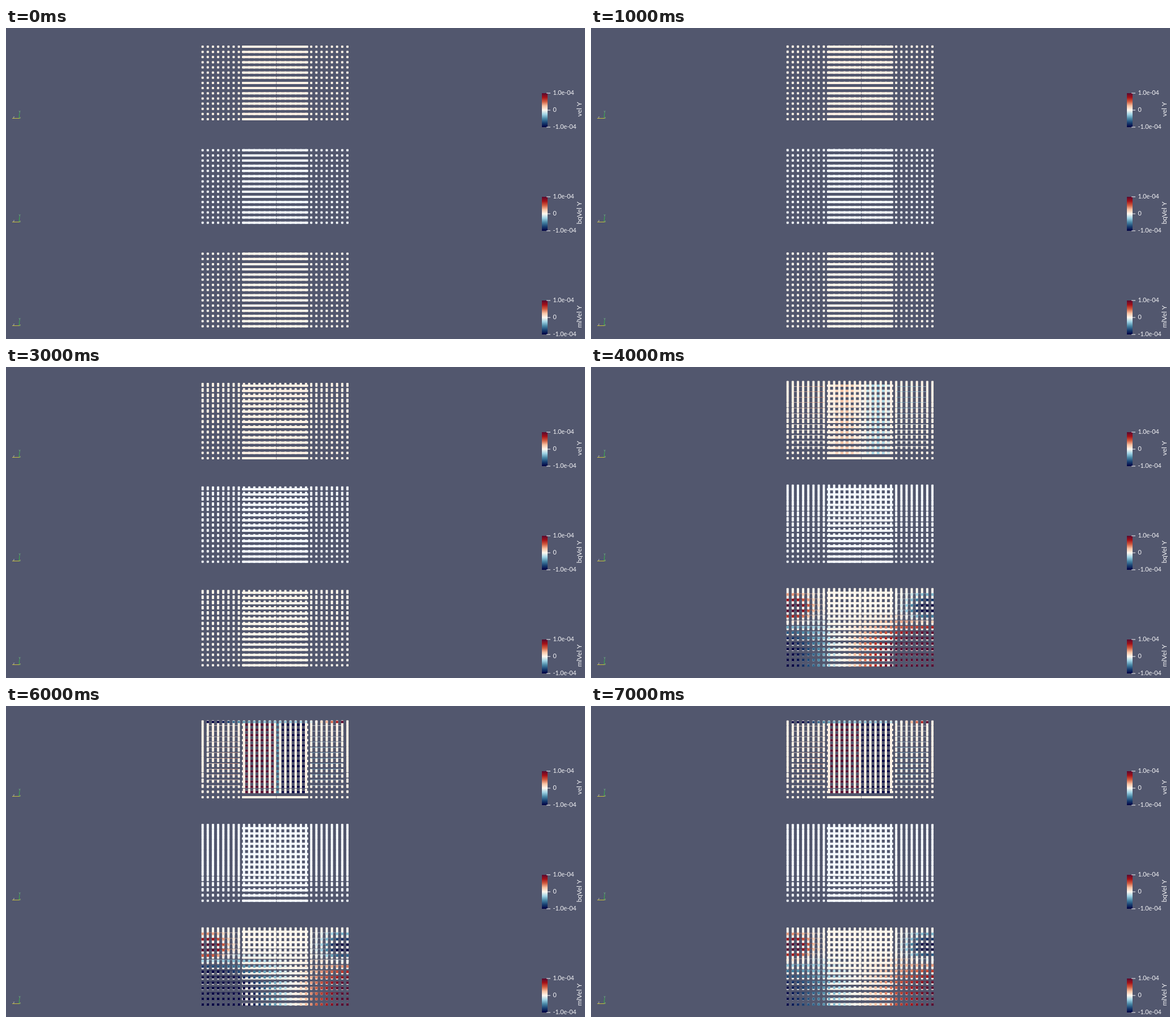
Write an HTML page with a canvas that moves like this. It is 1021 by 549 pixels and loops after 8 s.

```html
<!DOCTYPE html>
<html>
<head>
<meta charset="utf-8">
<style>
html, body { margin: 0; width: 100%; height: 100%; overflow: hidden; background: #52576e; }
canvas { display: block; }
</style>
</head>
<body>
<canvas id="stage" width="1021" height="549"></canvas>
<script>
const ctx = document.getElementById('stage').getContext('2d');
const BG = '#52576e', INK = '#f4f4f6', COLS = 29, ROWS = 15;
const colX = i => 346.7 + i * 9.12;
const rowY = j => 33 + j * 9.14;
const clamp = (v, a, b) => Math.max(a, Math.min(b, v));
const bump = (x, center, width) => Math.exp(-(((x - center) / width) ** 2));
const ramp = (x, a, b) => clamp((x - a) / (b - a), 0, 1);

// Diverging colour map, from -1 to 1
const STOPS = ['#000042', '#183e70', '#4886a4', '#a0d3e5', '#fff9f0', '#f8c4a5', '#d05c40', '#a41118', '#580a30']
  .map(hex => [1, 3, 5].map(k => parseInt(hex.slice(k, k + 2), 16)));
function heat(v) {
  const p = (clamp(v, -1, 1) + 1) * 4, k = Math.min(7, Math.floor(p)), f = p - k;
  return `rgb(${STOPS[k].map((c, n) => Math.round(c + (STOPS[k + 1][n] - c) * f))})`;
}

// Stretch of the top row; it grows, jumps at step 4, then settles
const rise = step => step < 4 ? step * step / 3 : 7.6 - step * 0.3;

// Middle block: up on the left, down on the right, four times stronger each step
const swirl = (step, x) => Math.sin(2 * Math.PI * x) * 0.25 * 4 ** (step - 4);

// Outer columns of the first panel
const drift = (step, u, v) =>
  Math.sin(2 * Math.PI * u) * 0.4 * bump(v, step > 5 ? 0.55 : 0.2, 0.3);

// Sloshing: the lower half tilts about a pivot, the upper corners go the other way
function slosh(step, u, v) {
  const [tilt, pivot] = [[3, 0.38], [-4, 0.82], [3.2, 0.63], [2, 0.48]][step - 4];
  const low = tilt * (u - pivot) * ramp(v, 0.3, 0.75);
  const corners = (bump(u, 0.03, 0.12) - bump(u, 0.97, 0.12)) * bump(v, 0.25, 0.16);
  return low + 1.3 * Math.sign(tilt) * corners;
}

// full: last row that is stretched all the way
const PANELS = [
  {
    name: 'vel Y', tint: '#fff2e5', side: drift,
    full(step, i) {
      if (step < 6) return 2;
      return i % 28 === 0 ? 9 : i > 7 && i < 21 ? 12.6 : 1;
    }
  },
  { name: 'bqVel Y', tint: '#f6fbff', full: step => step < 6 ? 1 : 9 },
  { name: 'mlVel Y', tint: '#fff8ec', side: slosh, dots: true, full: step => step < 7 ? 1 : 6 }
];

function rect(x, y, w, h, color) {
  ctx.fillStyle = color;
  ctx.fillRect(x, y, w, h);
}

function pill(x, y, w, h, color) {
  ctx.fillStyle = color;
  ctx.beginPath();
  ctx.roundRect(x, y, w, h, 1);
  ctx.fill();
}

function drawBlock({ tint, side, dots, full }, step) {
  const moving = step > 3, swirling = moving && side && !dots;
  const lift = (i, j) =>
    rise(step) * Math.min(1, (ROWS - 1 - j) / (ROWS - 1 - (moving ? full(step, i) : 0)));

  for (let j = 0; j < ROWS; j++) {
    const y = rowY(j) - 2;
    pill(416, y, 60.3, 4, tint);
    pill(477, y, 56, 4, tint);
    if (swirling && j < ROWS - 1) {
      for (let i = 8; i < 20; i++) rect(colX(i) + 2, y, 5.1, 4, heat(swirl(step, (i - 7.5) / 12.5)));
    }
  }

  for (let i = 0; i < COLS; i++) {
    for (let j = 0; j < ROWS; j++) {
      const d = lift(i, j), x = colX(i) - 2, y = rowY(j) - 2 - d;
      pill(x, y, 4, 4 + d, tint);
      if (moving && dots && j) rect(x, y, 4.2, 4.5, heat(slosh(step, i / 28, j / 14)));
    }
  }

  // Thin row lines between the outer columns
  if (moving && side) {
    ctx.globalAlpha = 0.6;
    for (let j = 1; j < ROWS - 2; j++) {
      for (let i = 1; i < COLS - 2; i++) {
        if (i > 6 && i < 21) continue;
        rect(colX(i), Math.round(rowY(j) - 2 - lift(3, j)), 9.1, 1, heat(side(step, i / 28, j / 14)));
      }
    }
    ctx.globalAlpha = 1;
  }
  if (swirling && step > 5) {
    for (let i = 1; i < COLS - 1; i++) {
      rect(colX(i) - 2, rowY(0) - 1 - rise(step), 4, 4, heat(1.6 * (i / 14 - 1) ** 3 - 0.3));
    }
  }
}

function label(text, x, y, size, color) {
  ctx.font = `${size}px Lato, sans-serif`;
  ctx.fillStyle = color;
  ctx.fillText(text, x, y);
}

function drawLegend(name) {
  const g = ctx.createLinearGradient(0, 175, 0, 115);
  for (let k = 0; k <= 8; k++) g.addColorStop(k / 8, heat(k / 4 - 1));
  rect(945, 115, 10, 60, g);
  ['1.0e-04', '0', '-1.0e-04'].forEach((text, k) => {
    const y = 115 + k * 30;
    rect(953, y - 0.5, 7, 1, INK);
    label(text, 964.5, y + 3.3, 10.8, INK);
  });
  ctx.save();
  ctx.translate(1015, 143.5);
  ctx.rotate(-Math.PI / 2);
  ctx.textAlign = 'center';
  label(name, 0, 0, 12, INK);
  ctx.restore();
}

function drawAxes() {
  rect(11, 159, 13, 1, '#c5bd3c');
  ctx.strokeStyle = '#35b54a';
  ctx.beginPath();
  ctx.moveTo(23, 159);
  ctx.lineTo(24, 150);
  ctx.stroke();
  label('Y', 22.5, 150, 5, '#79d987');
  label('Z', 12.5, 159, 4, '#d8d8d0');
  label('X', 23.5, 160, 4, '#a8d36b');
}

function draw(now) {
  const step = Math.floor((now % 8000) / 1000);
  rect(0, 0, 1021, 549, BG);
  PANELS.forEach((panel, p) => {
    ctx.save();
    ctx.translate(0, p * 182.8);
    drawBlock(panel, step);
    ctx.restore();
    ctx.save();
    ctx.translate(0, p * 183);
    drawLegend(panel.name);
    drawAxes();
    ctx.restore();
  });
}

const start = performance.now();
function tick() {
  draw(performance.now() - start);
  requestAnimationFrame(tick);
}
tick();
</script>
</body>
</html>
```
